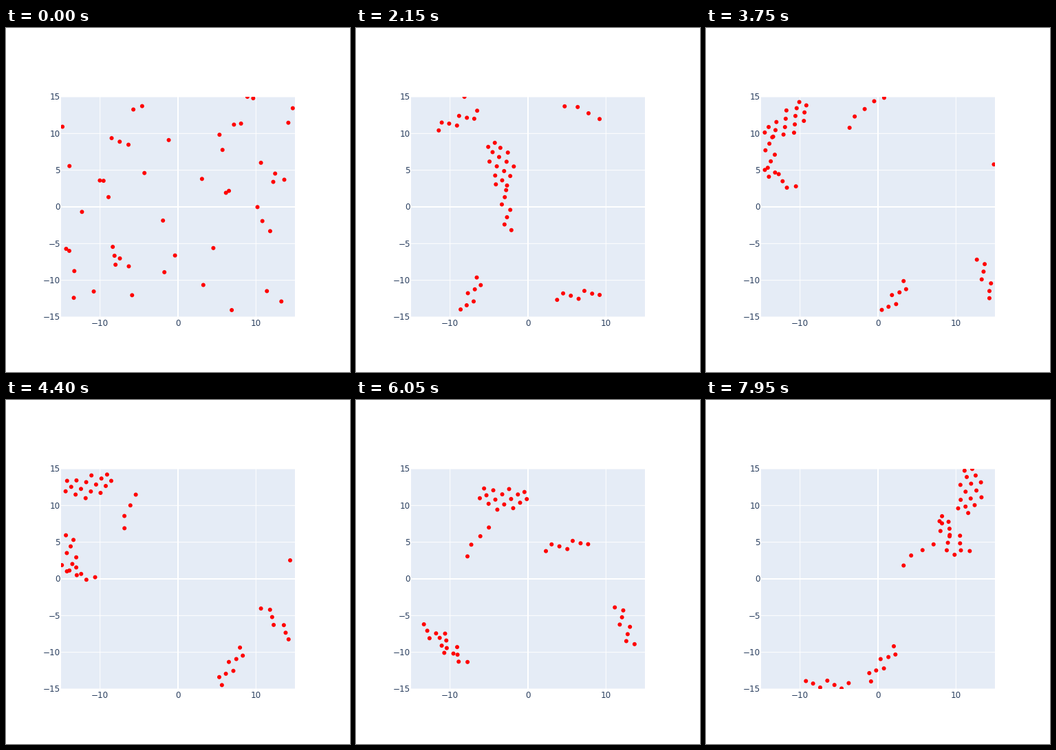
Recreate the animation shown at these times as a matplotlib script. Size 500 by 500 pixels, loop 8 s.

```python
import numpy as np
import matplotlib.pyplot as plt
from matplotlib.animation import FuncAnimation

FRAMES, STEP = 160, 50
HALF = 15
BOX = 2 * HALF
REACH = 3.2          # half length of every flock
GAP = 0.11           # half width per bird
MEET = 19            # frame at which the scattered birds have flocked
TIMES = np.array([0, MEET, 43, 75, 101, 140, 159])
INK = "#2a3f5f"

rng = np.random.default_rng(4)


class Flock:
    """Birds in a long formation that follows way points (x, y, tilt)."""

    def __init__(self, n, *points):
        self.points = np.array((points[0],) + points, float)
        t = (2 * np.arange(n) + 1) / n - 1
        side = 2 * ((0.3 + 0.618 * np.arange(n)) % 1) - 1
        self.slots = np.array([REACH * t, GAP * n * side * (1 - t * t / 2)])
        self.scatter = rng.uniform(-9, 9, (n, 2))
        self.slopes = np.gradient(self.points, TIMES, axis=0)

    def guide(self, frame):
        """Smooth cubic path through the way points."""
        i = np.clip(np.searchsorted(TIMES, frame, "right") - 1,
                    0, len(TIMES) - 2)
        h = TIMES[i + 1] - TIMES[i]
        u = (frame - TIMES[i]) / h
        a, b = self.points[i:i + 2]
        va, vb = self.slopes[i:i + 2] * h
        return (a + (b - a) * u * u * (3 - 2 * u)
                + va * u * (1 - u) ** 2 - vb * u * u * (1 - u))

    def birds(self, frame):
        x, y, tilt = self.guide(frame)
        c, s = np.cos(np.radians(tilt)), np.sin(np.radians(tilt))
        placed = (np.array([[c, -s], [s, c]]) @ self.slots).T + (x, y)
        stray = max(0, 1 - frame / MEET) ** 1.3
        return placed + stray * self.scatter


flocks = [
    Flock(16, (5.4, 6, 60), (-3.6, 5.8, 100), (-11.4, 11.8, 40),
          (-9.9, 13, -15), (4.9, 9.8, 30), (11.7, 12, 80)),
    Flock(7, (-8.1, -1.2, 47), (-2.8, -.5, 100), (-13, 4, 150),
          (-12.4, -3, 160), (-10, -12.5, 130), (-6.5, -14.4, 180)),
    Flock(8, (-13.8, 13, 90), (-9, 11.8, 25), (-13.9, 7.4, 100),
          (-12.6, -1.5, 100), (-5.5, -13.9, 180), (.6, -11.6, 235)),
    Flock(4, (10.8, 26.3, 0), (7, 13, -20), (-2.2, 12.7, 50),
          (-9.1, 5.7, 87), (-.8, 5.4, 25), (5.1, 3.4, 38)),
    Flock(7, (-.8, -11.3, 70), (6.4, -12, 10), (13.8, -9.7, -70),
          (10.3, -1.6, -12), (2.8, 7.8, 45), (8.7, 5.8, 110)),
    Flock(8, (-14, -12.5, 90), (-7.4, -12.3, 70), (2, -12.6, 60),
          (10.8, -10.5, 70), (11.4, -.9, 145), (9.8, 5.8, 130)),
]


def positions(frame):
    everyone = np.vstack([f.birds(frame) for f in flocks])
    return (everyone + HALF) % BOX - HALF


fig = plt.figure(figsize=(5, 5), dpi=100, facecolor="white")
ax = fig.add_axes([0.16, 0.16, 0.68, 0.64], facecolor="#E5ECF6")
ax.set(xlim=(-HALF, HALF), ylim=(-HALF, HALF), xticks=[], yticks=[])
ax.spines[:].set_visible(False)


def label(x, y, value, ha):
    fig.text(x / 500, 1 - y / 500, str(value).replace("-", "\u2212"),
             ha=ha, va="baseline", color=INK, size=8.64,
             family="DejaVu Sans")


for v in range(-HALF, HALF + 1, 5):
    line = dict(color="white", lw=0.72 if v else 1.44, zorder=1, snap=False)
    ax.axhline(v, **line)
    label(79, 264.2 - v * 320 / BOX, v, "right")
    if v % 10 == 0:
        ax.axvline(v, **line)
        label(250 + v * 340 / BOX, 433, v, "center")

first = positions(0)
dots = ax.scatter(*first.T, s=np.full(len(first), 4.32 ** 2), c="#ff0000",
                  linewidths=0, zorder=3)


def draw(frame):
    dots.set_offsets(positions(frame))
    return [dots]


anim = FuncAnimation(fig, draw, frames=FRAMES, interval=STEP, repeat=True,
                     repeat_delay=0, blit=False)
plt.show()
```
